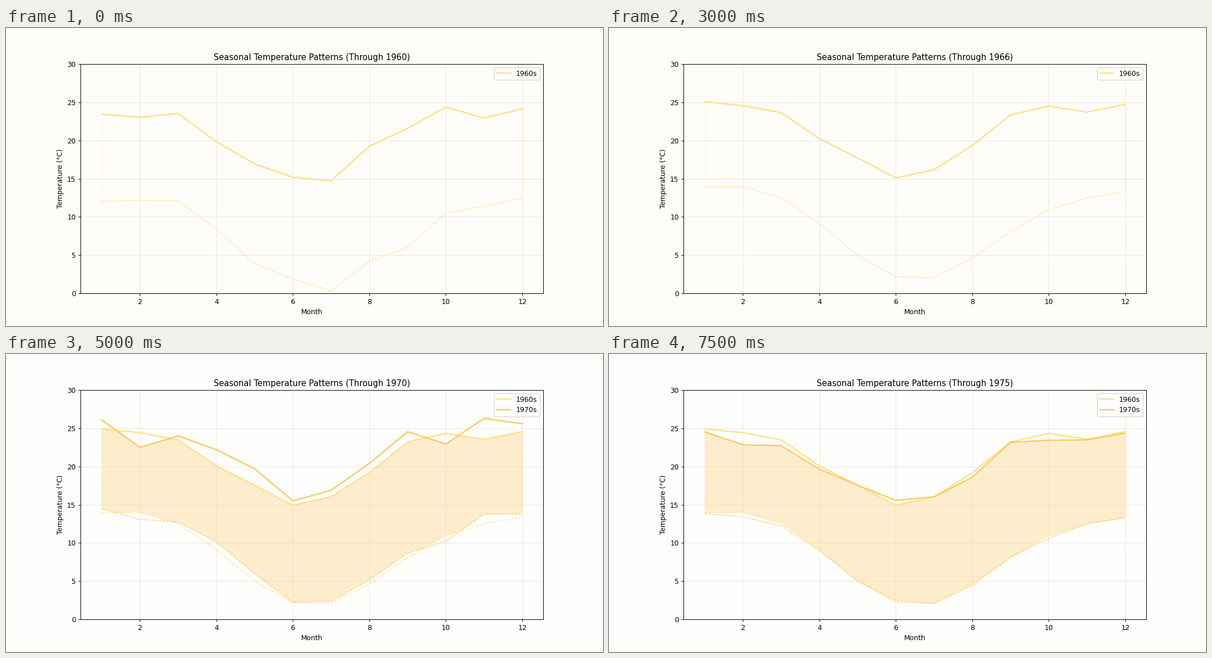
These frames come from a looping animation (1058x529 px, 8 s). A matplotlib script:

```python
import numpy as np
import matplotlib.pyplot as plt
from matplotlib.animation import FuncAnimation
from matplotlib.patches import Polygon

W, H = 1058, 529
MONTHS = np.arange(1, 13)
FINE = np.linspace(1, 12, 1101)
DRIFT = 0.06  # slow cooling of the highs, degrees per year

# Settled monthly highs, and how far the decade's first year strays from them
HIGHS = {
    1960: np.array([25.0, 24.5, 23.5, 20.1, 17.6, 14.95,
                    16.1, 19.2, 23.3, 24.35, 23.6, 24.6]),
    1970: np.array([24.45, 22.9, 22.65, 19.5, 17.4, 15.6,
                    16.0, 18.5, 23.1, 23.5, 23.3, 24.3]),
}
STRAY = {
    1960: np.array([-2.1, -2, -0.5, -0.8, -1.2, -0.3,
                    -1.9, -0.5, -2.25, -0.5, -1.2, -1]),
    1970: np.array([1.35, -0.7, 1.05, 2.4, 2, -0.4,
                    0.6, 1.6, 1.15, -0.85, 2.7, 1]),
}
LAST = {1960: 1969, 1970: 1975}
LOW_SHARE = {1960: 0.95, 1970: 0.5}  # part of the stray that lows follow
COLORS = {1960: "#fee187", 1970: "#fec965"}


def low_cycle():
    """Yearly wave of the lows plus its second harmonic."""
    t = 2 * np.pi * (MONTHS - 1) / 12
    return (9.08 + 5.95 * np.cos(t) - 0.9 * np.sin(t)
            - np.cos(2 * t) + 0.91 * np.sin(2 * t))


def means(start, year):
    """Running means of the decade; the stray fades as years add up."""
    year = min(year, LAST[start])
    stray = STRAY[start] * (year - start + 1) ** -1.5
    high = HIGHS[start] + stray + DRIFT * (LAST[start] - year)
    low = (low_cycle() + 0.4 * (HIGHS[start] - HIGHS[1960])
           + LOW_SHARE[start] * stray)
    return high, low


def band_patch(x, high, low, **style):
    pts = np.column_stack([np.r_[x, x[::-1]], np.r_[high, low[::-1]]])
    return ax.add_patch(Polygon(pts, closed=True, **style))


def tint_grid(patch, color, z):
    lines = [ax.axvline(x, color=color, lw=0.8, zorder=z)
             for x in range(2, 13, 2)]
    lines += [ax.axhline(y, color=color, lw=0.8, zorder=z)
              for y in range(5, 30, 5)]
    for line in lines:
        line.set_clip_path(patch)


def side(x, high, low, color):
    ax.plot([x, x], [low, high], color=color, lw=0.9, zorder=1.9,
            solid_capstyle="butt")


def plot_decade(start, high, low):
    color = COLORS[start]
    ax.plot(MONTHS, high, color=color, lw=2, label=f"{start}s")
    ax.plot(MONTHS, low, color=color, lw=1, ls="--")


def shade_overlap(old, new):
    span = band_patch(MONTHS, *new, fc="none", ec="none")
    tint_grid(span, "#fdebc8", 1.6)
    (h0, l0), (h1, l1) = [[np.interp(FINE, MONTHS, v) for v in band]
                          for band in (old, new)]
    high, low = np.minimum(h0, h1), np.maximum(l0, l1)
    shared = band_patch(FINE, high, low, fc="#fdedcc", ec="none", zorder=1.7)
    tint_grid(shared, "#f1dfbc", 1.8)
    side(1, high[0], low[0], "#fde5b4")
    side(12, high[-1], low[-1], "#fbdfa8")


def draw(i):
    year = 1960 + i
    both = year >= 1970
    paper = "#fefefd" if both else "#fffdf9"
    ax.clear()
    fig.set_facecolor(paper)
    ax.set_facecolor(paper)
    ax.set_xlim(0.45, 12.55)
    ax.set_ylim(0, 30)
    ax.grid(True, alpha=0.3)

    old = means(1960, year)
    plot_decade(1960, *old)
    if both:
        new = means(1970, year)
        plot_decade(1970, *new)
        shade_overlap(old, new)
    else:
        high, low = old
        side(1, high[0], low[0], "#fff4d2")
        side(12, high[-1], low[-1], "#f9e3aa")

    ax.set_title(f"Seasonal Temperature Patterns (Through {year})",
                 fontsize=11.92)
    ax.set_xlabel("Month")
    ax.set_ylabel("Temperature (°C)")
    ax.legend(loc="upper right", facecolor=paper,
              labelspacing=0.44, borderpad=0.37)


fig, ax = plt.subplots(figsize=(12, 6), dpi=W / 12)
fig.subplots_adjust(top=1 - 64.1 / H, bottom=1 - 471.1 / H)
anim = FuncAnimation(fig, draw, frames=16, interval=500,
                     init_func=lambda: draw(0), repeat=True, repeat_delay=0)
plt.show()
```
